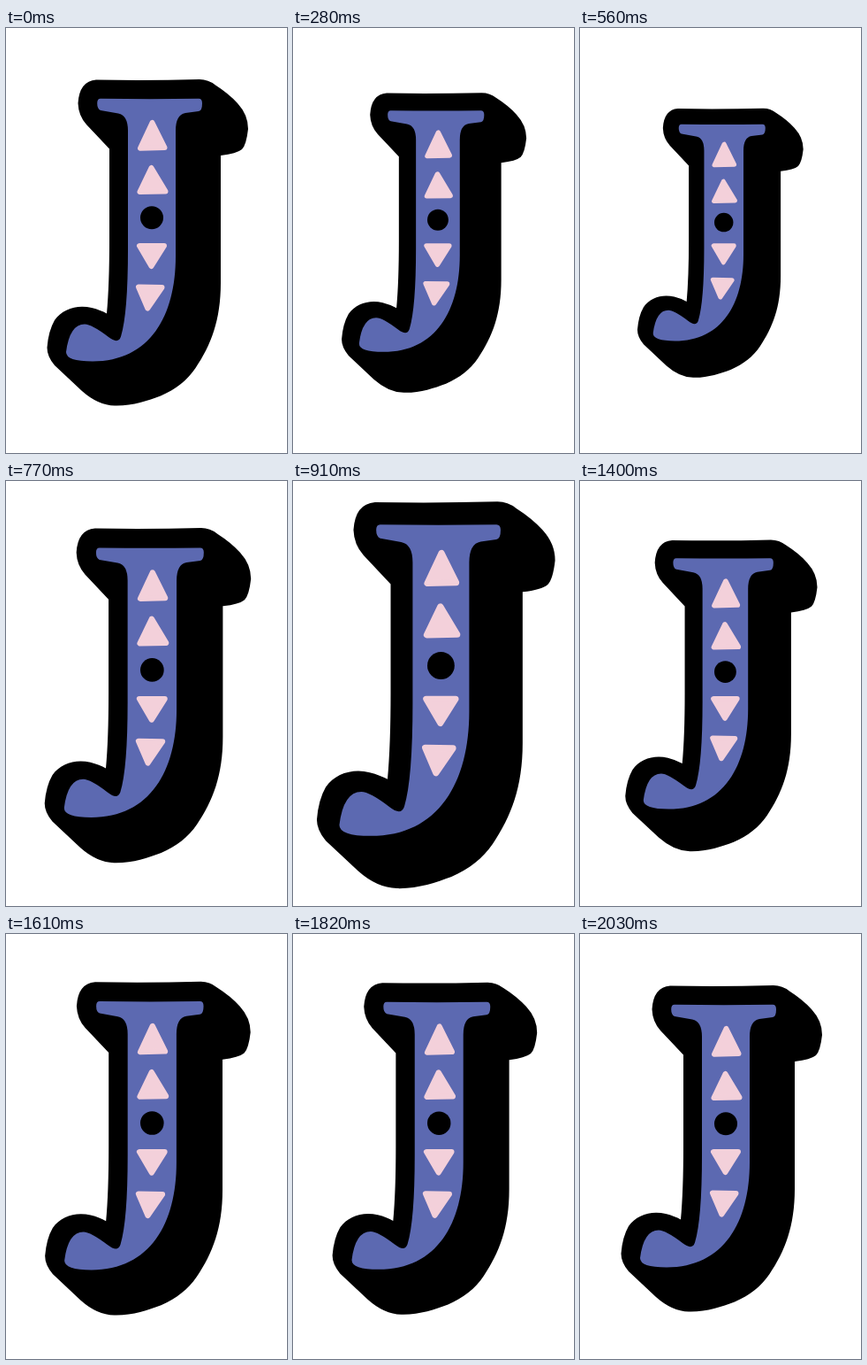
These frames come from a looping animation (318 by 480 pixels, 3.15 s). An HTML page:

```html
<!DOCTYPE html>
<html lang="en">
<head>
<meta charset="utf-8">
<title>Bouncing J</title>
<style>
  html, body { margin: 0; width: 100%; height: 100%; overflow: hidden; background: #fff; }
  svg { display: block; width: 100%; height: 100%; }
  .body { fill: #000; }
  .face { fill: #5c69b1; }
  .gems { fill: #f3d0da; stroke: #f3d0da; stroke-width: 6; stroke-linejoin: round; }
</style>
</head>
<body>
<svg viewBox="0 0 318 480">
  <g id="letter">
    <path class="body" d="M102 58.500 Q160 59.500 219 58 Q229 58 237 64.500 Q252 74 262 85 Q274 98 274 114
      Q272 132 267 137 Q261 142 243 144 V288 C243 330 232 358 214.500 384
      C205 398 192 408 175 415.500 C160 421 143 427 123 426.500
      Q104 426 86 410 L55 381 Q46.500 371 46.500 361 Q48 342 55 330 C64 317 81 312 97 316
      Q107 318.500 114 322.500 Q117 290 117 240 V136.500 L91 109 Q82 99 81.500 85 Q83 60 102 58.500 Z"/>
    <path class="face" d="M107 79.800 Q163 80.500 218 79.800 Q222 79.800 222 85 Q222 93.500 218 94
      L203 96 Q192 98 192 116 V258 C192 325 163 376.500 98 376.500
      Q68 376.500 68 366 Q72 334.500 89 334.500 Q97 334.500 116 349 Q127 357.500 130 348.500
      Q138 322 138 250 V116 Q138 98.500 127 96.500 L107 93 Q103.200 91.500 103.200 85 Q103.200 79.800 107 79.800 Z"/>
    <path class="gems" d="M165.500 107 L152 135.700 L179.500 135 Z M164.500 158 L151.500 185 L180.500 184.500 Z
      M151 246 L179 246 L164.500 269 Z M150 292.500 L176.500 293 L160.300 316.500 Z"/>
    <circle cx="165" cy="214.200" r="13"/>
  </g>
</svg>
<script>
  const LOOP = 3150, STEP = 70;
  const CENTER = [152, 245];

  // Turning points of the bounce; snap > 1 makes the move settle sooner.
  const keys = [
    { time: 0, scale: 1 },
    { time: 590, scale: 0.824, snap: 1 },
    { time: 980, scale: 1.2, snap: 1.2 },
    { time: 1400, scale: 0.955, snap: 1 },
    { time: 1685, scale: 1.027, snap: 1.35 },
    { time: 2030, scale: 1, snap: 1 }
  ];
  const letter = document.getElementById('letter');

  function scaleAt(time) {
    const next = keys.findIndex(key => key.time > time);
    if (next < 0) return 1;
    const from = keys[next - 1], to = keys[next];
    const progress = (time - from.time) / (to.time - from.time);
    const snapped = 1 - (1 - progress) ** to.snap;
    const eased = (1 - Math.cos(Math.PI * snapped)) / 2;
    return from.scale + (to.scale - from.scale) * eased;
  }

  function draw() {
    const time = Math.floor(performance.now() % LOOP / STEP) * STEP;
    const [x, y] = CENTER;
    letter.setAttribute('transform',
      `translate(${x} ${y}) scale(${scaleAt(time)}) translate(${-x} ${-y})`);
    requestAnimationFrame(draw);
  }
  draw();
</script>
</body>
</html>
```
